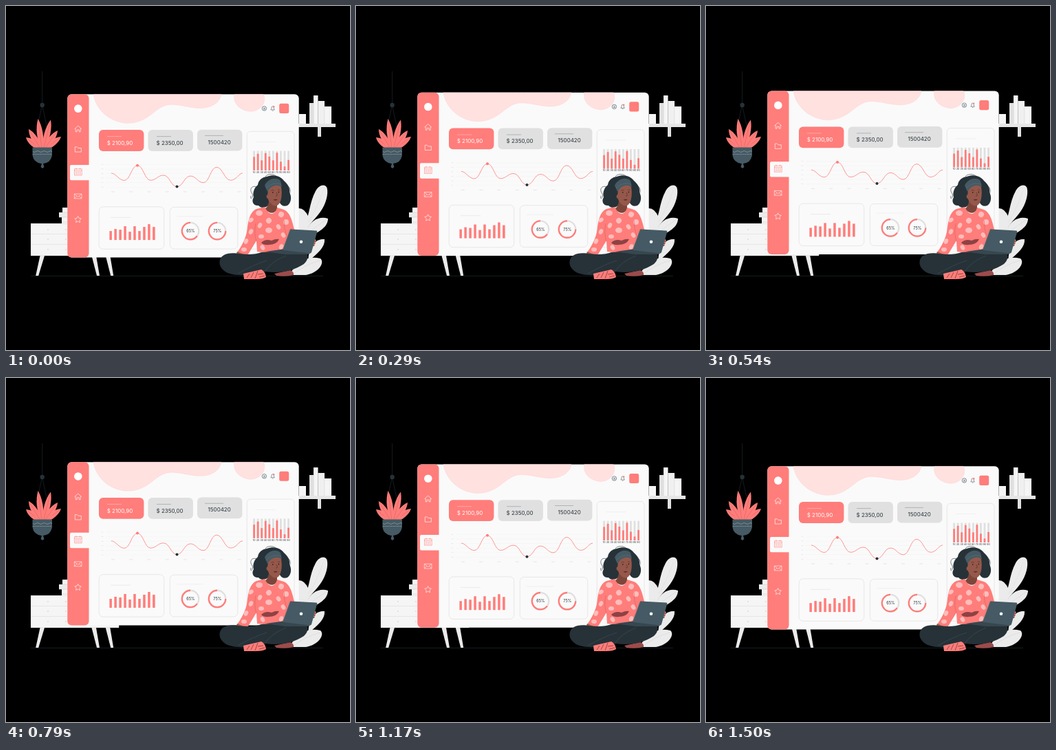
An HTML page with a canvas for the animation above (1.54 s loop, 500 by 500 pixels).

```html
<!DOCTYPE html>
<html lang="en">
<head>
<meta charset="utf-8">
<title>Dashboard</title>
<style>
  html, body { margin: 0; width: 100%; height: 100%; overflow: hidden; background: #000; }
  canvas { display: block; width: 500px; height: 500px; }
</style>
</head>
<body>
<canvas id="stage" width="500" height="500"></canvas>
<script>
const ctx = document.getElementById('stage').getContext('2d');
const LOOP = 1540, FRAME = 1000 / 24, LAST_FRAME = 36, REST = 0.3, LIFT = 6.5;
const CORAL = '#ff7d7a', PALE = '#ffe1e0', PAPER = '#fafafa', GREY = '#e0e0e0',
      DARK = '#263238', SLATE = '#455a64', SKIN = '#95584a', LEAF = '#ebebeb';

function fill(d, color) {
  ctx.fillStyle = color;
  ctx.fill(new Path2D(d));
}
function stroke(d, color, width = 0.6) {
  ctx.strokeStyle = color;
  ctx.lineWidth = width;
  ctx.stroke(new Path2D(d));
}
function rect(x, y, w, h, color) {
  ctx.fillStyle = color;
  ctx.fillRect(x, y, w, h);
}
function box(x, y, w, h, r, color, outline) {
  ctx.beginPath();
  ctx.roundRect(x, y, w, h, r);
  if (color) { ctx.fillStyle = color; ctx.fill(); }
  if (outline) { ctx.strokeStyle = outline; ctx.lineWidth = 0.7; ctx.stroke(); }
}
function oval(x, y, rx, ry, color, turn = 0) {
  ctx.beginPath();
  ctx.ellipse(x, y, rx, ry, turn, 0, Math.PI * 2);
  ctx.fillStyle = color;
  ctx.fill();
}
const dot = (x, y, r, color) => oval(x, y, r, r, color);
function label(text, x, y, size, color, weight = 400) {
  ctx.font = `${weight} ${size}px Inter, sans-serif`;
  ctx.textAlign = 'center';
  ctx.fillStyle = color;
  ctx.fillText(text, x, y);
}

// A pointed blade from the base to its tip, drawn along its own axis.
function blade(baseX, baseY, tipX, tipY, half, color, vein) {
  const length = Math.hypot(tipX - baseX, tipY - baseY);
  ctx.save();
  ctx.translate(baseX, baseY);
  ctx.rotate(Math.atan2(tipY - baseY, tipX - baseX));
  fill(`M0 -1.5C${length * 0.35} ${-half * 1.4} ${length * 0.75} ${-half * 1.2} ${length} 0C${length * 0.75} ${half * 1.2} ${length * 0.35} ${half * 1.4} 0 1.5Z`, color);
  stroke(`M0 0H${length * 0.95}`, vein, 0.4);
  ctx.restore();
}

function drawHangingPlant() {
  stroke('M52.7 95V142M52.5 144L39 206M52.5 144L66 206', DARK, 0.6);
  dot(52.7, 144, 3.2, DARK);
  const tips = [[29, 191], [80, 190], [33, 179], [75, 181], [65, 165.5], [46.5, 164]];
  for (const [x, y] of tips) blade(53 + (x - 53) * 0.12, 208, x, y, 4.2, CORAL, '#c75b5c');
  fill('M38.5 205.5H67V217Q65 228 54 229H51Q40 227 38.5 217Z', SLATE);
  stroke('M39 211.5q2.3 2 4.7 0t4.7 0t4.7 0t4.7 0t4.7 0t4.5 0', '#a4b1b7', 0.6);
  ctx.setLineDash([1.5, 1]);
  stroke('M39 215.5H66', '#b7c2c7', 0.6);
  ctx.setLineDash([]);
  fill('M52 229H54L55.5 234L53 236L50.5 234Z', SLATE);
}

function drawShelf() {
  rect(426, 157, 10, 14, '#f5f5f5');
  rect(441, 141, 6.5, 30, GREY);
  rect(447, 130, 6.5, 41, '#f5f5f5');
  rect(453.5, 138, 9.5, 33, '#f0f0f0');
  rect(462.5, 146, 10.5, 25, '#f5f5f5');
  stroke('M453.5 138V171M462.7 146V171M447.3 141V171', '#cfcfcf', 0.5);
  rect(420, 171, 59, 5, '#e6e6e6');
  rect(453, 176, 5, 14, GREY);
}

function drawConsole() {
  rect(82, 293, 20, 7, '#f5f5f5');
  rect(77, 300, 24, 7, '#ebebeb');
  rect(81, 307, 22, 9, '#f5f5f5');
  stroke('M82 300H90M77 307H90M81 314H90', '#cfcfcf', 0.6);
  for (const [x, bottom] of [[49.5, 43.2], [124.5, 132], [144.8, 152.2]]) {
    fill(`M${x} 363h6.5L${bottom + 4} 392h-4Z`, LEAF);
  }
  rect(36, 316, 128, 47, '#f5f5f5');
  stroke('M36.4 316.4H164V362.7H36.4ZM37 331.5H90M37 346.5H90', '#dcdcdc');
  for (const y of [325, 339, 354]) {
    dot(61, y, 0.8, '#cacaca');
    dot(87, y, 0.8, '#cacaca');
  }
}

function drawFloorPlant() {
  fill('M433 321C441 306 441 285 450 269C455 260 463 258 466.5 264C469 273 465 288 457 299C450 309 443 314 438 324Z', LEAF);
  stroke('M435 321Q452 296 461 268', '#dcdcdc');
  fill('M424 294Q434 293 440 307L438 329H420Z', LEAF);
  fill('M436 327C443 310 457 305 468 309C468 321 455 329 440 335Z', LEAF);
  fill('M440 362C444 343 454 338 463 339C464 350 454 359 439 371Z', LEAF);
  fill('M412 391C422 371 439 362 457 367C464 373 454 388 436 391Z', LEAF);
  stroke('M416 391Q434 376 456 370M438 331Q452 319 465 311', '#d6d6d6');
}

function drawSidebar() {
  box(89.3, 128, 31.2, 237.3, 6, CORAL);
  dot(104.8, 148.8, 5.8, '#fff');
  box(93, 230.6, 28, 22.4, [2, 0, 0, 2], PAPER);
  ctx.lineJoin = 'round';
  const line = '#ffe9e8';
  stroke('M99.5 178.5L104.7 173.8L109.9 178.5M101.2 177.5V182.5H103.2V179.7H106.2V182.5H108.2V177.5', line, 0.8);
  stroke('M100.3 204.5H103.5L105 206.2H109.3V211.8H100.3Z', line, 0.8);
  stroke('M99.5 236.5H110.2V245.7H99.5ZM99.5 239H110.2M102 235V237.5M107.6 235V237.5', CORAL, 0.6);
  for (let i = 0; i < 6; i++) rect(101.3 + i % 3 * 2.8, 240.6 + Math.floor(i / 3) * 2.4, 1.4, 1.2, CORAL);
  stroke('M99.3 272.8H110V279.6H99.3ZM99.3 273L104.6 277L110 273M99.3 279.4L103 276M110 279.4L106.3 276', line, 0.7);
  let star = '';
  for (let i = 0; i < 10; i++) {
    const r = i % 2 ? 2.6 : 5, a = i * Math.PI / 5;
    star += `${i ? 'L' : 'M'}${104.6 + r * Math.sin(a)} ${310.2 - r * Math.cos(a)}`;
  }
  stroke(star + 'Z', line, 0.8);
}

function drawHeader() {
  const blobs = ['M127 128C130 147 146 167 174 170C211 171 216 142 242 143C263 144 278 152 296 146C307 142 311 136 313 128Z',
                 'M332 128C329 143 343 153 357 153C373 151 379 137 374 128Z'];
  for (const d of blobs) {
    fill(d, PALE);
    ctx.setLineDash([1.5, 0.8]);
    stroke(d, '#ffc4c2', 0.5);
    ctx.setLineDash([]);
  }
  stroke('M378.6 148.6a3.2 3.2 0 1 1-6.4 0a3.2 3.2 0 1 1 6.4 0M374 148h3M374 149.7h3', SLATE, 0.7);
  stroke('M384.9 150.6Q386 149.5 386 147.5Q386 145.5 387.6 145.5Q389.2 145.5 389.2 147.5Q389.2 149.5 390.4 150.6ZM387 151.9h1.4', SLATE, 0.6);
  dot(389.2, 146, 1.2, CORAL);
  box(397.2, 141.5, 14, 14.2, 2.5, CORAL);
}

function drawTotals() {
  const cards = [['$ 2100,90', 135, 165.5, CORAL, '#fff'], ['$ 2350,00', 206.5, 238, GREY, DARK], ['1500420', 278, 310.2, GREY, DARK]];
  cards.forEach(([text, x, center, back, ink], i) => {
    const rise = i === 2 ? 1.2 : 0;
    box(x, 179.8 - rise / 3, 65.4, 30.8, 6, back);
    const start = [147, 219, 289][i];
    stroke(`M${start} ${189.3 - rise}h${i === 2 ? 27 : 21}`, i ? '#7c8488' : '#ffd0cf', 0.5);
    label(text, center, 201.5 - rise, 8, ink);
  });
}

function drawCurve() {
  for (let i = 0; i < 6; i++) {
    const y = 230 + i * 6.6;
    stroke(`M145 ${y}H344`, '#f0f0f0', 0.5);
    rect(138.5, y - 0.5, 3, 0.8, '#e6e6e6');
  }
  for (let i = 0; i < 8; i++) rect(153 + i * 26.2, 269.2, 5, 1, '#e6e6e6');
  const points = [[172, 253.2], [191, 231.4], [210, 253], [229, 245.7], [248.5, 262.3],
                  [268, 246.8], [287, 256.5], [306, 234], [326.5, 253]];
  let d = 'M153 242.6C160 243 164 253.2 172 253.2';
  for (let i = 1; i < points.length; i++) {
    const [x0, y0] = points[i - 1], [x, y] = points[i], h = (x - x0) * 0.45;
    d += `C${x0 + h} ${y0} ${x - h} ${y} ${x} ${y}`;
  }
  stroke(d + 'C335 253 338 243 344 242.6', CORAL, 0.8);
  dot(191, 231.4, 2, CORAL);
  dot(248.5, 262.3, 2, DARK);
}

function drawCharts() {
  box(350.3, 182, 68.8, 171, 5, null, GREY);
  stroke('M363 197.3H392', '#e4e4e4', 0.5);
  const tops = [219, 214.5, 224, 213.5, 218.5, 224, 213, 226, 233, 223.5];
  tops.forEach((top, i) => {
    const x = 359.2 + i * 5.55;
    rect(x, 210.3, 2.8, 28.4, GREY);
    rect(x, top, 2.8, 238.7 - top, CORAL);
    label(Math.min(90, (i + 1) * 10), x + 1.4, 242.4, 3.6, DARK);
  });

  box(135.2, 291.5, 94.5, 61.5, 6, null, GREY);
  stroke('M152 307H181', '#d8d8d8', 0.5);
  [327, 324, 325, 320, 328, 320, 327, 321, 317, 321].forEach((top, i) =>
    rect(150.4 + i * 6.97, top - 0.2, 3.5, 340 - top, CORAL));

  box(238.3, 292, 98.5, 60.8, 6, null, GREY);
  stroke('M248 305.5H287', '#e4e4e4', 0.5);
  for (const [x, share] of [[268, 0.65], [307, 0.75]]) {
    const top = -Math.PI / 2;
    const ring = (end, color) => {
      ctx.beginPath();
      ctx.arc(x, 326.8, 12.2, top, end, true);
      ctx.strokeStyle = color;
      ctx.lineWidth = 2.3;
      ctx.stroke();
    };
    ring(top - Math.PI * 2, GREY);
    ring(top - Math.PI * 2 * share, CORAL);
    label(`${share * 100}%`, x + 0.3, 329, 5.6, DARK);
  }
}

function drawPanel(shift) {
  ctx.save();
  ctx.translate(0, shift);
  box(89.3, 128, 336.4, 237.3, 6, PAPER);
  drawHeader();
  drawSidebar();
  drawTotals();
  drawCurve();
  drawCharts();
  ctx.restore();
}

function drawHead() {
  fill('M379 248C389 244 399 247 404 254C410 259 413 265 412 271C416 278 414 287 409 290C404 292 400 290 398 286L382 288C380 293 371 295 367 290C360 291 356 284 360 278C358 271 361 264 366 260C367 253 372 249 379 248Z', DARK);
  stroke('M364 263C357 260 353 267 358 273C360 279 354 283 356 276M405 260C412 260 415 268 412 273M377 248C379 244 389 243 393 248', DARK, 0.6);
  fill('M382 282L394 287L394 296Q387 306 376 295Q382 291 382 282Z', '#7d463b');
  fill('M381 265C386 259 396 258 400 263C402 275 400 287 394 290C388 292 382 286 380 278Z', SKIN);
  fill('M376 261C379 252 392 247 399 254L401 263C392 258 385 262 380 270Z', SLATE);
  stroke('M378 265Q387 255 400 259', '#61747c', 0.5);
  oval(380.5, 277, 1.9, 2.8, SKIN);
  oval(387.8, 271, 0.7, 1, '#1b2225');
  oval(396.4, 270.5, 0.7, 1, '#1b2225');
  stroke('M385.3 268.3q2.5-1.8 4.5-.2M394.8 267.5q2-1.2 3.4.2M393 271q2.3 4 .8 5h-1.7', '#4a2a25', 0.6);
  fill('M388.5 281.5Q392 280 395 281.2Q392 284 388.5 281.5Z', '#5c2c2b');
}

function drawSweater() {
  const shape = 'M376 292C382 305 391 305 394 293L404 296C413 300 416 312 419 325L411 337L409 356Q387 360 365 357L364 341L350 364L336 358C346 344 350 333 351 321C353 306 357 298 364 295Z';
  fill(shape, CORAL);
  ctx.save();
  ctx.clip(new Path2D(shape));
  const spots = [[368, 301, 5, 4], [382, 312, 4, 4], [400, 303, 4, 4], [407, 314, 4, 4], [356, 311, 3, 4],
                 [369, 319, 4, 3], [382, 326, 5, 4], [396, 321, 4, 3], [356, 328, 4, 3], [371, 335, 4, 3],
                 [403, 333, 4, 3], [349, 342, 4, 3], [346, 354, 4, 3], [373, 351, 4, 3], [400, 350, 4, 3]];
  spots.forEach(([x, y, rx, ry], i) => oval(x, y, rx, ry, '#ffbdbb', i % 3));
  ctx.restore();
  stroke('M363 316Q360 331 364 342M404 311Q404 324 408 334', '#d85f60', 0.6);
  fill('M371 344Q377 338 386 341Q392 338 397 339Q393 347 382 347Q375 348 371 344Z', '#8d4244');
}

function drawLegs() {
  fill('M336 357L350 363L346 370L333 365Z', SKIN);
  fill('M390 389L413 384Q419 386 418 391Q407 394 393 392Z', '#9c4b4b');
  fill('M310.5 372C311 362 321 358 335 359.5C351 362 363 361 371 358C389 357 414 355 432 357C441 359 440 369 433 375C417 385 400 389 377 386L348 391C332 392 320 389 315 383Q310 378 310.5 372Z', DARK);
  stroke('M337 389Q360 376 379 370M376 386Q386 371 407 363', '#415159', 0.6);
  fill('M345 389L371 383Q377 386 378 394Q374 397 363 397H346Z', CORAL);
  stroke('M350 395L354 389M356 395L360 387M362 396L366 385M366 390L374 389M368 394L376 392', '#7d3c3c', 0.8);
}

function drawLaptop() {
  fill('M377 357L406 353L443 358L440 361L406 361Z', '#37474f');
  fill('M443 337Q450 337 451 341L448 349L441 349Z', SKIN);
  stroke('M446 340l4 .6M445 343l5 .6M445 346l4 .6', '#ff9b98', 0.8);
  fill('M413 325Q413 324 415 324.5L451 326.5Q453 327 452 329L444 358Q443 360 441 359.5L404 355Q402 354.5 403 352Z', SLATE);
  stroke('M413 325L403 353', '#60747d', 0.6);
  dot(429, 342.7, 2.3, '#fff');
}

function render(now) {
  const frame = Math.min(LAST_FRAME, Math.floor((now % LOOP + 5) / FRAME));
  const shift = REST - LIFT * (1 - Math.abs(1 - 2 * frame / LAST_FRAME));
  rect(0, 0, 500, 500, '#000');
  stroke('M36 392.4H461', DARK, 0.6);
  drawHangingPlant();
  drawShelf();
  drawConsole();
  drawFloorPlant();
  drawPanel(shift);
  drawHead();
  drawSweater();
  drawLegs();
  drawLaptop();
}

const start = performance.now();
function tick() {
  render(performance.now() - start);
  requestAnimationFrame(tick);
}
tick();
</script>
</body>
</html>
```
